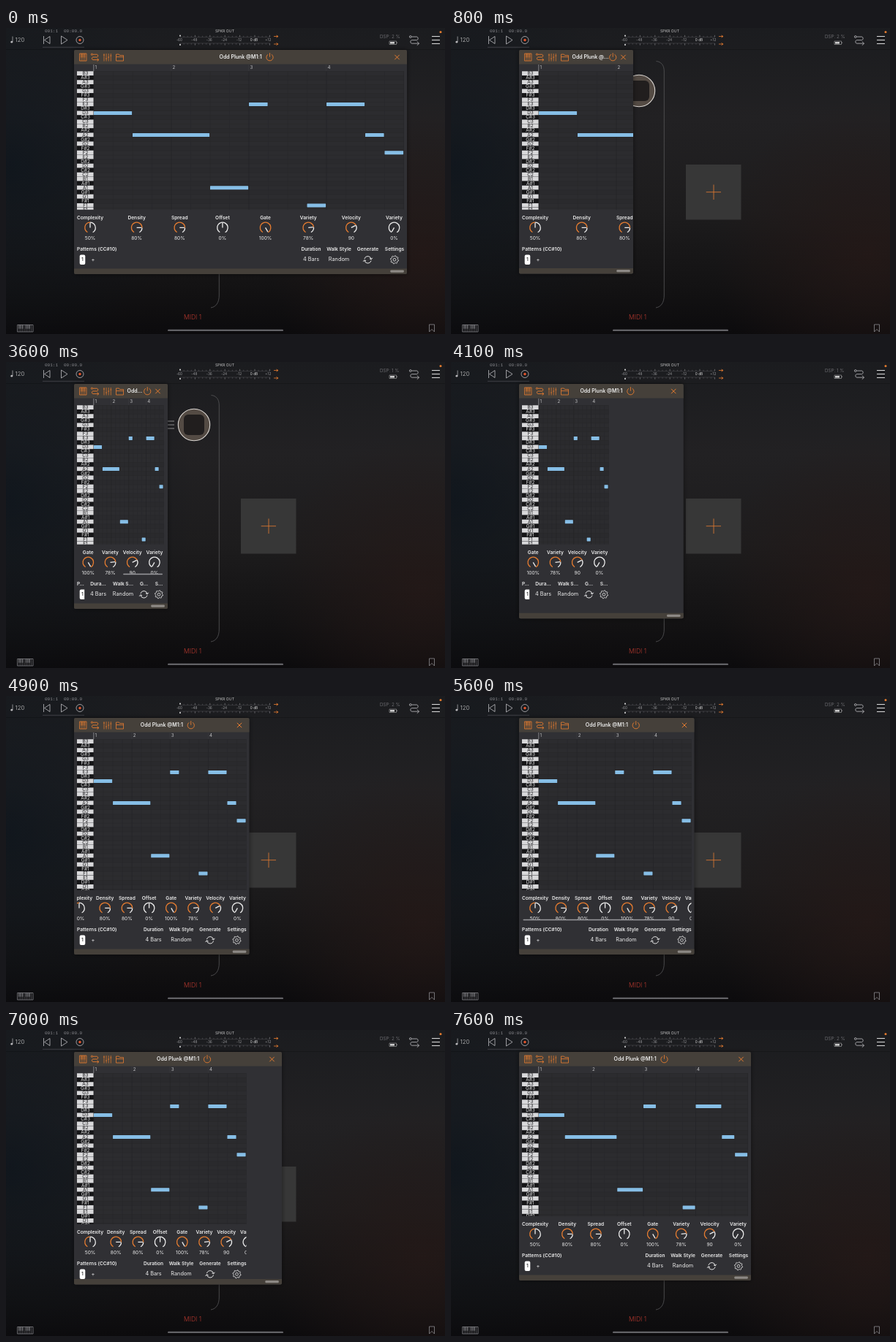
These frames come from a looping animation (600x419 px, 8000 ms). An HTML page with a canvas:

```html
<!DOCTYPE html>
<html lang="en">
<head>
<meta charset="utf-8">
<title>Resizable plugin window</title>
<style>
  html, body { margin: 0; width: 100%; height: 100%; overflow: hidden; background: #0c0d0f; }
  canvas { display: block; width: 600px; height: 419px; }
</style>
</head>
<body>
<canvas id="stage"></canvas>
<script>
const LOOP = 8000, STEP = 100;
const ORANGE = '#e67c30', WHITE = '#ececec', ICON = '#bdbdc0', BODY = '#303034', FRAME = '#45403a';
const LEFT = 93, TOP = 30, TITLE = 'Odd Plunk @M1:1';

const canvas = document.getElementById('stage');
const ratio = window.devicePixelRatio || 1;
canvas.width = 600 * ratio;
canvas.height = 419 * ratio;
const ctx = canvas.getContext('2d');

// Timelines: [ms, value]
const RIGHT_EDGE = [[0, 548], [100, 543], [300, 471], [500, 369], [700, 274], [800, 249], [1000, 223],
  [1100, 219.5], [3500, 219.5], [3600, 221], [3800, 252], [4000, 303], [4200, 332.5],
  [6700, 332.5], [6900, 362], [7100, 392], [7300, 410]];
const BOTTOM_EDGE = [[0, 337], [800, 336.5], [1100, 338], [3600, 338], [4200, 354], [6700, 354], [7300, 343]];
const SCROLL = [[0, 0], [1900, 0], [2000, 12], [2300, 118], [2500, 128.5], [4200, 128.5], [4300, 15],
  [5100, 15], [5500, 0]];
const BAR_ALPHA = [[0, 0], [1900, 0], [2000, 1], [3600, 1], [3900, 0], [5100, 0], [5200, 1], [6400, 1], [6700, 0]];
// The content is laid out again only once a drag is over: [ms, right, bottom]
const LAYOUTS = [[0, 548, 337], [1200, 219.5, 338], [4300, 332.5, 354], [7500, 410, 343]];

const NOTE_NAMES = ['B', 'A#', 'A', 'G#', 'G', 'F#', 'F', 'E', 'D#', 'D', 'C#', 'C'];
const ROW = 6.02, ROLL_TOP = 59.3;
// [row below B3, start beat, beats]
const NOTES = [[9, 0, 2], [14, 2, 4], [26, 6, 2], [7, 8, 1], [30, 11, 1], [7, 12, 2], [14, 14, 1], [18, 15, 1]];
// [label, value text, pointer, filled part]
const KNOBS = [['Complexity', '50%', .5, .5], ['Density', '80%', .8, .8], ['Spread', '80%', .8, .8],
  ['Offset', '0%', .5, 0], ['Gate', '100%', 1, 1], ['Variety', '78%', .78, .78],
  ['Velocity', '90', .71, .71], ['Variety', '0%', 0, 0]];
const ROUTE = 'M3.5 1.5H10.5a2.4 2.4 0 0 1 0 4.6H3.5a2.4 2.4 0 0 0 0 4.6H13.5M10.8 8.2l2.8 2.5-2.8 2.5' +
  'M3.2 1.5a1.4 1.4 0 1 1-2.8 0a1.4 1.4 0 1 1 2.8 0';

function valueAt(track, t) {
  let prev = track[0];
  for (const key of track) {
    if (t < key[0]) return prev[1] + (key[1] - prev[1]) * (t - prev[0]) / (key[0] - prev[0]);
    prev = key;
  }
  return prev[1];
}

function rect(x, y, w, h, color, r = 0) {
  ctx.fillStyle = color;
  ctx.beginPath();
  ctx.roundRect(x, y, w, h, r);
  ctx.fill();
}

function stroke(d, color, width = 1, x = 0, y = 0, scale = 1) {
  ctx.save();
  ctx.translate(x, y);
  ctx.scale(scale, scale);
  ctx.strokeStyle = color;
  ctx.lineWidth = width / scale;
  ctx.stroke(new Path2D(d));
  ctx.restore();
}

function arc(x, y, r, from, to, color, width = 1) {
  ctx.beginPath();
  ctx.arc(x, y, r, from * Math.PI / 180, to * Math.PI / 180);
  ctx.strokeStyle = color;
  ctx.lineWidth = width;
  ctx.stroke();
}

function disc(x, y, r, color) {
  ctx.beginPath();
  ctx.arc(x, y, r, 0, 7);
  ctx.fillStyle = color;
  ctx.fill();
}

function text(str, x, y, size, color, align = 'center', weight = 400, family = 'Inter, sans-serif') {
  ctx.font = `${weight} ${size}px ${family}`;
  ctx.textAlign = align;
  ctx.textBaseline = 'middle';
  ctx.fillStyle = color;
  ctx.fillText(str, x, y);
}

function glow(x, y, r, color) {
  const g = ctx.createRadialGradient(x, y, 0, x, y, r);
  g.addColorStop(0, `rgba(${color},.75)`);
  g.addColorStop(1, `rgba(${color},0)`);
  rect(0, 0, 600, 419, g);
}

function piano(x, y, w, h, keys, color, width) {
  const k = w / keys;
  stroke(`M0 0H${w}V${h}H0Z`, color, width, x, y);
  for (let i = 1; i < keys; i++) {
    stroke(`M${i * k} 0V${h}`, color, width * .7, x, y);
    if (i % 4) rect(x + i * k - k * .22, y, k * .44, h * .55, color);
  }
}

function drawBackground() {
  const g = ctx.createLinearGradient(0, 0, 0, 419);
  g.addColorStop(0, '#1b1c1f');
  g.addColorStop(.3, '#222123');
  g.addColorStop(.6, '#1d1c1d');
  g.addColorStop(.85, '#131213');
  g.addColorStop(1, '#0c0b0d');
  rect(0, 0, 600, 419, g);
  glow(0, 190, 260, '12,20,28');
  glow(570, 310, 210, '38,25,23');
  rect(0, 29.2, 600, .8, 'rgba(0,0,0,.3)');
}

function drawTopBar(dsp) {
  stroke('M9 11.5V19', ICON, .7);
  disc(7.8, 19.2, 1.4, ICON);
  text('120', 12.6, 16.5, 7.8, '#ccc', 'left', 300);
  const mono = '"Liberation Mono", monospace';
  text('001:1', 53, 4.5, 6, '#85858a', 'left', 400, mono);
  text('00:00.0', 79, 4.5, 6, '#85858a', 'left', 400, mono);
  stroke('M50 26.3H107', '#4a4a50', .8);
  stroke('M51.5 11V22M60 11.5L52.5 16.5L60 21.5ZM75.5 11L84 16.5L75.5 22Z', ICON, .8);
  arc(101, 16.5, 5, 0, 360, ICON, .8);
  disc(101, 16.5, 1.7, '#e8562c');

  text('SPKR OUT', 299, 4, 5.2, '#c4c4c4');
  for (let i = 0; i <= 24; i++) {
    const x = 238 + i * 5.1, tall = i % 4 === 0 ? 2.6 : 1.6;
    stroke(`M${x} ${12.4 - tall}V12.4M${x} 21V${21 + tall}`, i % 4 ? '#66666a' : '#98989b', .6);
  }
  stroke('M238 12.6H361M238 20.9H361', '#4c4c51', .5);
  disc(238, 10.5, .9, WHITE);
  disc(238, 23, .9, WHITE);
  ['-60', '-48', '-36', '-24', '-12', '0 dB', '+12'].forEach((label, i) =>
    text(label, 237 + i * 20.4 - (i === 6 ? 1 : 0), 16.7, 4.8, i === 5 ? '#ddd' : '#98989b'));
  stroke('M366 11.5H372M369.5 10L372 11.5L369.5 13M366 22H372M369.5 20.5L372 22L369.5 23.5', ORANGE, .8);

  text(`DSP: ${dsp} %`, 511, 12, 6.3, '#808085', 'left', 300);
  stroke('M524 18H533.5V22.5H524ZM534.6 19.3V21.2', '#aaa', .6);
  rect(525, 19, 6, 2.6, '#ccc');
  stroke(ROUTE, ICON, .8, 551, 10.5);
  stroke('M582 11.5H593M582 16.5H593M582 21.5H593', '#dcdcdc', 1);
  disc(594, 5.5, 1.5, ORANGE);
}

function drawChannel() {
  stroke('M280.5 45.5C287 46 291.3 51 291.3 59V366C291.3 376 287 382 280 383', '#58585b', .8);
  stroke('M219 81H230M219 86H230M219 91H230', '#aaa', .8);
  disc(257, 86, 22, '#544b44');
  arc(257, 86, 21.7, 0, 360, '#d8d4d0', 1.1);
  rect(243, 72, 28, 28, '#211e1e', 6);
  rect(321, 187, 75.5, 75.5, '#373737');
  stroke('M359 214.5V235M348.7 224.7H369', ORANGE, .8);
  text('MIDI 1', 255, 396, 8.5, '#b9392f', 'center', 300);
}

function drawBottomBar() {
  piano(15.5, 406.5, 21.5, 9.5, 9, '#8c8c90', .7);
  rect(221, 412.7, 158, 2.4, '#626266', 1.2);
  stroke('M578.5 406V416L582 412.5L585.5 416V406Z', '#8c8c90', .8);
}

function fit(str, width) {
  if (ctx.measureText(str).width <= width) return str;
  let n = str.length;
  while (n > 1 && ctx.measureText(str.slice(0, n) + '…').width > width) n--;
  return str.slice(0, n) + '…';
}

function drawTitle(right) {
  rect(LEFT, TOP, right - LEFT, 19.5, FRAME, [2, 2, 0, 0]);
  piano(100.5, 35, 9.5, 10, 4, ORANGE, .8);
  stroke(ROUTE, ORANGE, .9, 116, 35, .8);
  for (let i = 0; i < 4; i++) {
    const x = 134 + i * 3.1, y = 37 + (i * 5) % 7;
    stroke(`M${x} 35V45.5M${x - 1.1} ${y}H${x + 1.1}`, ORANGE, .7);
  }
  stroke('M150.5 45V36H154.5L155.5 37.5H160.5V45ZM150.5 39.5H160.5', ORANGE, .8);

  const close = right - 13.5;
  const start = Math.max(165.5, (LEFT + right) / 2 - 29);
  const power = Math.min(start + 69, close - 14.3);
  ctx.font = '600 7px Inter, sans-serif';
  text(fit(TITLE, power - 5.5 - start), start, 40, 7, '#eee', 'left', 600);
  arc(power, 40.2, 4.6, -60, 240, ORANGE, .9);
  stroke('M0 -6V-.5', ORANGE, .9, power, 40.2);
  stroke('M-3.2 -3.2L3.2 3.2M3.2 -3.2L-3.2 3.2', ORANGE, 1, close, 40);
}

function drawRoll(right, end) {
  const width = right - 4 - 120, beat = width / 16;
  ctx.save();
  ctx.beginPath();
  ctx.rect(97, ROLL_TOP - .3, right - 101, end - ROLL_TOP + .3);
  ctx.clip();
  rect(120, ROLL_TOP - .3, width, 300, '#2c2c2f');
  for (let i = 0; ROLL_TOP + i * ROW < end; i++) {
    const y = ROLL_TOP + i * ROW, name = NOTE_NAMES[i % 12], sharp = name.length > 1;
    if (sharp) rect(120, y, width, ROW, '#2a2a2d');
    rect(120, y, width, .5, '#262629');
    rect(97, y, 22.8, ROW - .3, sharp ? '#151517' : '#d8d8da');
    text(name + (3 - Math.floor(i / 12)), 108.5, y + ROW / 2, 6.4, sharp ? '#e4e4e4' : '#1c1c1e');
  }
  for (let b = 0; b <= 16; b++) rect(120 + b * beat - .3, ROLL_TOP, .6, 300, b % 4 ? '#28282b' : '#232326');
  for (const [row, start, beats] of NOTES)
    rect(120 + start * beat, ROLL_TOP + row * ROW + .5, beats * beat - .9, 5, '#86bee6', .6);
  ctx.restore();

  for (let bar = 0; bar < 4; bar++) {
    const x = 120 + bar * beat * 4;
    rect(x - .5, 50, .7, 9, bar ? '#3a3a3e' : '#a0a0a3');
    text(bar + 1, x + 1.6, 54.5, 6.2, '#c0c0c2', 'left');
  }
}

function drawKnob(x, y, [label, value, pointer, filled]) {
  const a = 120 + 300 * pointer, split = 120 + 300 * filled, rad = a * Math.PI / 180;
  text(label, x, y - 13.4, 6.6, WHITE, 'center', 600);
  arc(x, y, 7.3, split, 420, WHITE, 1.3);
  if (filled) arc(x, y, 7.3, 120, split, ORANGE, 1.3);
  stroke(`M0 0L${Math.cos(rad) * 6.6} ${Math.sin(rad) * 6.6}`, WHITE, 1.3, x, y);
  text(value, x, y + 14.3, 6.6, WHITE);
}

function drawKnobs(right, end, scroll, barAlpha) {
  const clipRight = right - 4, view = clipRight - 97, content = 247;
  const gap = Math.max(30.2, (right - 17.5 - 120) / 7);
  ctx.save();
  ctx.beginPath();
  ctx.rect(97, end, view, 48);
  ctx.clip();
  KNOBS.forEach((knob, i) => drawKnob(115 + i * gap + (i ? 5 : 0) - scroll, end + 24.6, knob));
  if (barAlpha > 0 && view < content) {
    const thumb = view * view / content - 3;
    const x = 98.5 + Math.min(1, scroll / (content - view)) * (view - thumb - 3);
    ctx.globalAlpha = barAlpha;
    rect(x, end + 40, thumb, 1.5, '#99999d', .7);
  }
  ctx.restore();
}

function drawGenerate(x, y) {
  arc(x, y, 4.7, 195, 345, WHITE, 1);
  arc(x, y, 4.7, 15, 165, WHITE, 1);
  stroke('M2.4 -1.6L4.7 -.4L6.3 -2.5M-2.4 1.6L-4.7 .4L-6.3 2.5', WHITE, 1, x, y);
}

function drawGear(x, y) {
  let d = '';
  for (let i = 0; i < 32; i++) {
    const a = (i + .5) * Math.PI / 16, r = i % 4 < 2 ? 5.6 : 4.4;
    d += `${i ? 'L' : 'M'}${Math.cos(a) * r} ${Math.sin(a) * r}`;
  }
  stroke(d + 'Z', WHITE, .8, x, y);
  arc(x, y, 1.9, 0, 360, WHITE, .8);
}

function drawActions(right, end) {
  const compact = right - LEFT < 200;
  const labels = compact ? ['Dura…', 'Walk S…', 'G…', 'S…'] : ['Duration', 'Walk Style', 'Generate', 'Settings'];
  const xs = (compact ? [93.5, 59.5, 31, 10.5] : [131, 93, 53.5, 17]).map(d => right - d);
  const labelY = end + 54.2, y = end + 68.5;
  text(compact ? 'P…' : 'Patterns (CC#10)', 97, labelY, 6.6, WHITE, 'left', 600);
  rect(100.7, y - 6.7, compact ? 6.5 : 7.6, 13.4, '#fff', compact ? [2, 0, 0, 2] : 2);
  text('1', 104.5, y, 6.8, '#222', 'center', 500);
  if (!compact) text('+', 119, y, 7.4, WHITE);
  labels.forEach((label, i) => text(label, xs[i], labelY, 6.6, WHITE, 'center', 600));
  text('4 Bars', xs[0], y, 7.3, WHITE);
  text('Random', xs[1], y, 7.3, WHITE);
  drawGenerate(xs[2], y);
  drawGear(xs[3], y);
}

function drawWindow(t) {
  const right = valueAt(RIGHT_EDGE, t), bottom = valueAt(BOTTOM_EDGE, t);
  const [, layRight, layBottom] = LAYOUTS.filter(l => l[0] <= t).pop();
  const end = layBottom - 88.2, barTop = bottom - 7.5;

  ctx.save();
  ctx.shadowColor = 'rgba(0,0,0,.5)';
  ctx.shadowBlur = 6 * ratio;
  rect(LEFT, TOP, right - LEFT, bottom - TOP, BODY, 2);
  ctx.restore();

  ctx.save();
  ctx.beginPath();
  ctx.rect(LEFT, 49.5, right - LEFT, barTop - 49.5);
  ctx.clip();
  drawRoll(layRight, end);
  drawKnobs(layRight, end, valueAt(SCROLL, t), valueAt(BAR_ALPHA, t));
  drawActions(layRight, end);
  ctx.restore();

  drawTitle(right);
  rect(LEFT, barTop, right - LEFT, 7.5, FRAME, [0, 0, 2, 2]);
  rect(right - 22.7, bottom - 5.6, 18.5, 3.3, '#8d8985', 1.2);
}

function draw(t) {
  ctx.setTransform(ratio, 0, 0, ratio, 0, 0);
  drawBackground();
  drawTopBar(t >= 2000 && t < 4400 ? 1 : 2);
  drawChannel();
  drawBottomBar();
  drawWindow(t);
}

const begin = performance.now();
function tick() {
  const t = (performance.now() - begin) % LOOP;
  draw(Math.floor(t / STEP) * STEP);
  requestAnimationFrame(tick);
}
tick();
</script>
</body>
</html>
```
